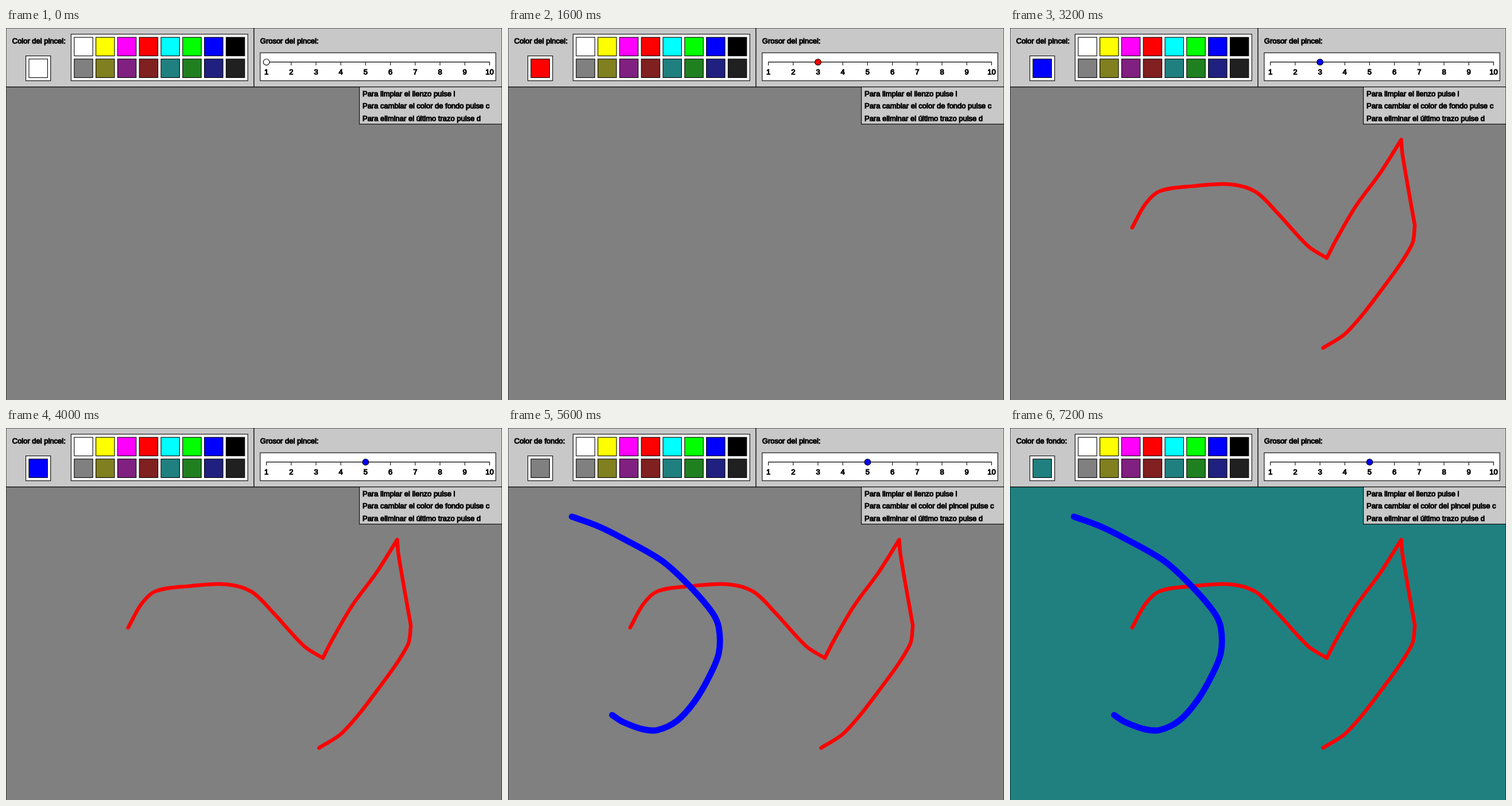
Animation of 864 by 648 pixels, one loop 8 s. Source, as an HTML page with a canvas:

```html
<!DOCTYPE html>
<html lang="es">
<head>
<meta charset="utf-8">
<title>Lienzo</title>
<style>
html, body { margin: 0; width: 100%; height: 100%; overflow: hidden; background: #808080; }
canvas { display: block; }
</style>
</head>
<body>
<canvas id="stage" width="864" height="648"></canvas>
<script>
const ctx = document.getElementById('stage').getContext('2d');
const W = 800, H = 600; // drawing units, scaled up to the canvas
const STEP = 800;
const PANEL = '#c8c8c8';

// The columns count down in binary: one bit each for red, green and blue.
const shades = (on, off) => Array.from({ length: 8 }, (_, i) =>
  `rgb(${[4, 2, 1].map(bit => (7 - i) & bit ? on : off)})`);
const BRIGHT = shades(255, 0), DARK = shades(128, 32);
const [WHITE, , MAGENTA, RED, , , BLUE, BLACK] = BRIGHT;
const [GRAY, , , , TEAL] = DARK;

// Each stroke is a chain of smooth runs that meet in corners.
const STROKES = [
  { color: RED, size: 3, runs: [
    [[197, 322], [219, 283], [242, 263], [296, 255], [355, 252], [396, 264], [431, 298], [481, 352], [511, 371]],
    [[511, 371], [527, 340], [558, 287], [597, 234], [631, 180]],
    [[631, 180], [633, 204], [653, 319]],
    [[653, 319], [648, 350], [601, 420], [543, 491], [505, 516]]
  ] },
  { color: BLUE, size: 5, runs: [
    [[103, 143], [142, 157], [183, 177], [248, 214], [293, 255], [329, 297], [340, 322], [340, 363],
     [324, 402], [301, 441], [273, 472], [242, 487], [218, 486], [185, 474], [168, 463]]
  ] }
];

// What changes at each step; everything else carries over.
const STEPS = [
  { brush: WHITE, size: 1, drawn: 0, bg: GRAY, pickBg: false },
  { size: 3 },
  { brush: RED },
  { drawn: 1 },
  { brush: BLUE },
  { size: 5 },
  { drawn: 2 },
  { pickBg: true },
  { bg: MAGENTA },
  { bg: TEAL }
];
const STATES = STEPS.map((_, i) => Object.assign({}, ...STEPS.slice(0, i + 1)));

function box(x, y, w, h, fill) {
  ctx.fillStyle = fill;
  ctx.fillRect(x, y, w, h);
  ctx.strokeRect(x, y, w, h);
}

function label(text, x, y, align = 'left') {
  ctx.textAlign = align;
  ctx.fillStyle = BLACK;
  ctx.strokeText(text, x, y);
  ctx.fillText(text, x, y);
}

function line(x1, y1, x2, y2) {
  ctx.beginPath();
  ctx.moveTo(x1, y1);
  ctx.lineTo(x2, y2);
  ctx.stroke();
}

// Curve through the points, each tangent parallel to its neighbours' chord.
function smooth(pts) {
  const tangent = i => {
    const [ax, ay] = pts[Math.max(i - 1, 0)];
    const [bx, by] = pts[Math.min(i + 1, pts.length - 1)];
    const d = Math.hypot(bx - ax, by - ay);
    return [(bx - ax) / d, (by - ay) / d];
  };
  ctx.lineTo(...pts[0]);
  for (let i = 1; i < pts.length; i++) {
    const [x0, y0] = pts[i - 1], [x1, y1] = pts[i];
    const [ux, uy] = tangent(i - 1), [vx, vy] = tangent(i);
    const k = Math.hypot(x1 - x0, y1 - y0) / 3;
    ctx.bezierCurveTo(x0 + ux * k, y0 + uy * k, x1 - vx * k, y1 - vy * k, x1, y1);
  }
}

function drawStroke({ color, size, runs }) {
  ctx.save();
  ctx.strokeStyle = color;
  ctx.lineWidth = 2 * size;
  ctx.lineJoin = 'round';
  ctx.beginPath();
  runs.forEach(smooth);
  ctx.stroke();
  ctx.restore();
}

function drawColors({ pickBg, bg, brush }) {
  box(0, 0, W / 2, 95, PANEL);
  label(pickBg ? 'Color de fondo:' : 'Color del pincel:', 10, 25);
  box(32, 45, 40, 40, WHITE);
  box(37, 50, 30, 30, pickBg ? bg : brush);
  box(105, 10, 285, 75, WHITE);
  [BRIGHT, DARK].forEach((row, j) => row.forEach((color, i) =>
    box(110 + 35 * i, 15 + 35 * j, 30, 30, color)));
}

function drawSlider({ size, brush }) {
  const at = n => 380 + 40 * n;
  box(W / 2, 0, W / 2, 95, PANEL);
  label('Grosor del pincel:', 410, 25);
  box(410, 40, 380, 45, WHITE);
  line(at(1), 55, at(10), 55);
  for (let n = 1; n <= 10; n++) {
    line(at(n), 55, at(n), 60);
    label(n, at(n), 75, 'center');
  }
  ctx.fillStyle = brush;
  ctx.beginPath();
  ctx.arc(at(size), 55, 5, 0, 2 * Math.PI);
  ctx.fill();
  ctx.stroke();
}

function drawHelp({ pickBg }) {
  box(570, 95, 230, 60, PANEL);
  [
    'Para limpiar el lienzo pulse l',
    `Para cambiar el color ${pickBg ? 'del pincel' : 'de fondo'} pulse c`,
    'Para eliminar el último trazo pulse d'
  ].forEach((text, i) => label(text, 575, 110 + 20 * i));
}

function render(state) {
  box(0, 95, W, H, state.bg);
  STROKES.slice(0, state.drawn).forEach(drawStroke);
  drawColors(state);
  drawSlider(state);
  drawHelp(state);
}

ctx.scale(864 / W, 648 / H);
ctx.strokeStyle = BLACK;
ctx.lineCap = 'round';
ctx.font = '12px "Liberation Sans", Arial, sans-serif';

const start = performance.now();
function tick() {
  const t = Math.max(0, performance.now() - start);
  render(STATES[Math.floor(t / STEP) % STATES.length]);
  requestAnimationFrame(tick);
}
tick();
</script>
</body>
</html>
```
